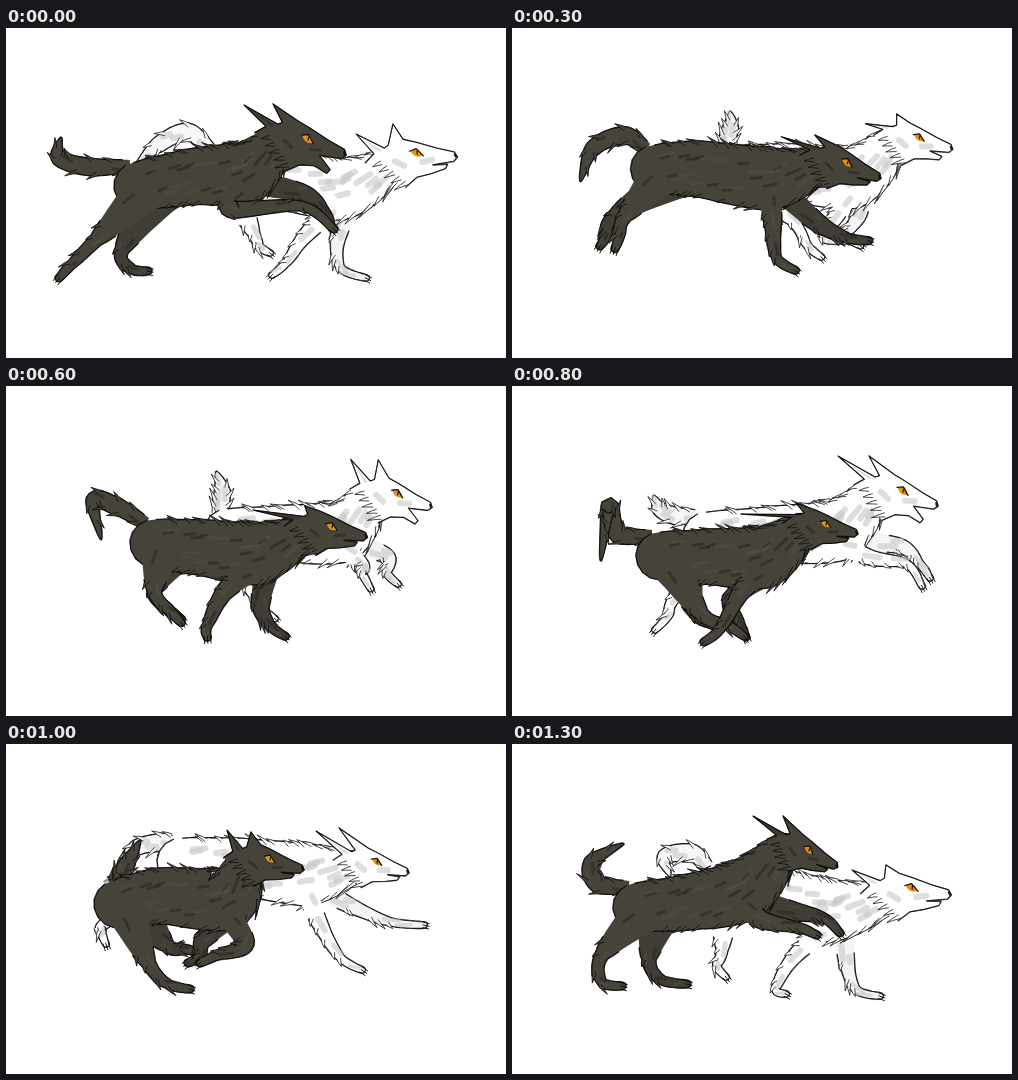
These frames come from a looping animation (500 px wide and 330 px high, 1.4 s). An HTML page with a canvas:

```html
<!DOCTYPE html>
<html lang="en">
<head>
<meta charset="utf-8">
<title>Two running wolves</title>
<style>
html, body { margin: 0; width: 100%; height: 100%; overflow: hidden; background: #fff; }
canvas { display: block; width: 500px; height: 330px; }
</style>
</head>
<body>
<canvas id="stage" width="500" height="330"></canvas>
<script>
const ctx = document.getElementById('stage').getContext('2d');
const STEP = 100, STEPS = 14;
const keys = [0, 2, 5, 8, 10, 12, 13, 14];

// Each pose: spine (rump, waist, chest) / tail / face (ear tips, eye, nose) /
// near fore leg / far fore leg / near hind leg / far hind leg
const darkPoses = [
  '132,158 185,149 240,143 / 85,139 53,130 55,110 / 238,77 267,76 302,111 339,126 / 225,181 295,178 328,201 / 298,166 318,182 326,200 / 90,212 66,236 53,250 / 116,222 126,241 142,243',
  '140,136 182,133 262,143 / 112,108 80,125 54,158 / 276,102 301,100 337,131 368,148 / 284,188 298,225 322,239 / 325,183 362,194 384,194 / 105,186 92,203 81,216 / 88,186 70,205 58,213',
  '148,151 195,157 250,165 / 112,106 83,112 98,142 / 256,122 306,121 332,142 368,152 / 214,205 198,238 206,249 / 272,222 284,242 302,250 / 128,194 139,218 147,230 / 130,194 141,217 148,228',
  '148,170 200,171 252,170 / 106,148 97,120 89,174 / 229,128 284,117 314,138 345,147 / 230,205 208,243 192,256 / 220,213 228,238 234,251 / 190,228 215,239 232,250 / 185,228 210,238 230,243',
  '112,160 155,152 220,154 / 112,136 122,118 134,97 / 221,86 245,88 264,115 297,125 / 239,200 212,211 194,219 / 198,195 194,212 182,219 / 143,220 162,240 184,245 / 162,202 178,205 188,207',
  '125,157 180,155 232,146 / 82,140 104,114 98,91 / 222,82 253,82 275,107 309,117 / 258,178 278,185 272,205 / 262,184 255,194 240,200 / 97,214 106,240 127,245 / 154,216 164,236 190,242',
  '125,163 178,158 232,145 / 86,140 80,118 111,100 / 241,72 271,72 297,106 325,122 / 250,176 285,183 305,191 / 285,168 312,174 328,189 / 90,211 90,238 110,242 / 137,216 150,236 175,240'
];
const palePoses = [
  '215,145 265,150 335,160 / 182,104 152,117 130,138 / 350,106 387,96 411,125 450,128 / 300,207 280,235 266,247 / 332,210 335,240 360,250 / 248,206 254,219 264,225',
  '220,140 270,142 340,150 / 204,110 203,100 205,89 / 353,106 387,91 415,110 447,120 / 306,195 300,220 322,217 / 330,195 318,215 333,226 / 275,185 288,215 298,230',
  '235,145 285,147 340,145 / 240,111 250,94 245,74 / 354,75 380,76 392,109 425,121 / 354,184 336,190 342,204 / 378,176 368,192 379,201 / 292,208 312,224 332,227',
  '195,150 265,148 325,143 / 165,130 148,123 142,110 / 326,70 357,70 391,105 425,119 / 360,172 395,178 410,200 / 388,160 408,178 418,192 / 162,212 156,230 143,244',
  '175,118 230,122 300,130 / 155,98 130,104 112,120 / 310,87 333,84 371,118 402,128 / 315,182 335,214 356,226 / 345,162 385,178 418,181 / 103,176 96,188 100,200',
  '200,140 255,152 310,160 / 148,119 152,101 180,101 / 333,120 341,110 386,146 425,151 / 280,200 270,233 296,243 / 345,205 368,235 394,243 / 172,190 168,203 172,210',
  '205,145 262,152 320,166 / 180,109 153,113 158,132 / 340,126 374,121 400,144 438,150 / 283,212 264,244 274,250 / 335,220 345,246 368,252 / 210,206 205,222 214,233'
];
const parts = ['spine', 'tail', 'face', 'fn', 'ff', 'hn', 'hf'];
const girth = { spine: [24, 28, 32, 17], tail: [6, 9, 8, 1], fore: [13, 9, 5, 4], hind: [23, 7, 5, 4] };

// Skull outline, with the eye at the origin and the nose at (1, 0)
const brow = [[-0.38, -0.32], [-0.05, -0.27], [0.5, -0.16], [0.95, -0.1], [1.04, 0.02], [0.95, 0.14], [0.42, 0.27]];
const chin = [[0.8, 0.22], [0.76, 0.34], [0.4, 0.5], [0.05, 0.62], [-0.22, 0.9]];

const coats = {
  dark: {
    poses: darkPoses, fill: '#46433b', far: '#403d36', tail: '#46433b', line: '#100f0c',
    marks: ['rgba(32,30,25,.45)', 'rgba(92,88,77,.3)'], brush: 3, slim: 1, gape: [1, 0, 0, 0, 0, 0, 0]
  },
  pale: {
    poses: palePoses, fill: '#fff', far: '#f4f4f4', tail: '#f7f7f7', line: '#1a1a1a',
    marks: ['rgba(200,200,200,.6)'], brush: 6, slim: 0.85, gape: [0, 0, 1, 1, 0, 0, 0]
  }
};
for (const coat of Object.values(coats))
  coat.poses = coat.poses.map(row => Object.fromEntries(row.split(' / ').map((list, i) =>
    [parts[i], list.split(' ').map(p => p.split(',').map(Number))])));

const lerp = (a, b, t) => a + (b - a) * t;
const mix = (a, b, t) => [lerp(a[0], b[0], t), lerp(a[1], b[1], t)];
const add = (p, x, y) => [p[0] + x, p[1] + y];
const rand = n => { const v = Math.sin(n * 91.7 + 3.1) * 4375.5; return v - Math.floor(v); };

// Catmull-Rom curve through the joints, with a half width, tangent and normal at each sample
function sample(joints, widths, slim, n = 36) {
  const last = joints.length - 1, at = i => joints[Math.max(0, Math.min(last, i))];
  const spots = [];
  for (let k = 0; k <= n; k++) {
    const u = k / n * last, i = Math.min(last - 1, Math.floor(u)), f = u - i;
    const [a, b, c, d] = [at(i - 1), at(i), at(i + 1), at(i + 2)];
    const p = [0, 1].map(j => b[j] + f / 2 * (c[j] - a[j] +
      f * (2 * a[j] - 5 * b[j] + 4 * c[j] - d[j] + f * (3 * (b[j] - c[j]) + d[j] - a[j]))));
    spots.push({ p, w: slim * lerp(widths[i], widths[i + 1], f) });
  }
  spots.forEach((s, k) => {
    const a = spots[Math.max(0, k - 1)].p, b = spots[Math.min(n, k + 1)].p;
    const d = Math.hypot(b[0] - a[0], b[1] - a[1]) || 1;
    s.t = [(b[0] - a[0]) / d, (b[1] - a[1]) / d];
    s.n = [-s.t[1], s.t[0]];
  });
  return spots;
}

const edge = (s, v) => [s.p[0] + s.n[0] * s.w * v, s.p[1] + s.n[1] * s.w * v];

function cap(s, from) {
  const a = Math.atan2(s.n[1], s.n[0]) + from;
  const out = [];
  for (let i = 1; i < 8; i++) {
    const b = a + Math.PI * i / 8;
    out.push([s.p[0] + Math.cos(b) * s.w, s.p[1] + Math.sin(b) * s.w]);
  }
  return out;
}

function path(pts) {
  ctx.beginPath();
  pts.forEach(p => ctx.lineTo(...p));
}

// Ink line with a faint second pass, as drawn by hand
function ink(pts, color) {
  path(pts);
  ctx.strokeStyle = color;
  ctx.lineWidth = 1.1;
  ctx.stroke();
  path(pts.map((p, i) => add(p, 0.6 * Math.sin(i * 0.7), 0.6 * Math.cos(i * 0.5))));
  ctx.lineWidth = 0.6;
  ctx.stroke();
}

function tube(spots, fill, line, skip, roundStart) {
  const outline = list => [
    ...list.map(s => edge(s, -1)),
    ...cap(list[list.length - 1], Math.PI),
    ...list.map(s => edge(s, 1)).reverse(),
    ...(roundStart ? cap(list[0], 0) : [])
  ];
  path(outline(spots));
  ctx.fillStyle = fill;
  ctx.fill();
  ink(outline(spots.slice(skip)), line);
}

function hair(p, dir, len, fill, line, width = 2) {
  const tip = add(p, dir[0] * len, dir[1] * len);
  const root = add(p, -dir[0] * 4, -dir[1] * 4);
  ctx.beginPath();
  ctx.moveTo(root[0] - dir[1] * width, root[1] + dir[0] * width);
  ctx.quadraticCurveTo(p[0] - dir[1] * width, p[1] + dir[0] * width, ...tip);
  ctx.quadraticCurveTo(p[0] + dir[1], p[1] - dir[0], root[0] + dir[1] * width, root[1] - dir[0] * width);
  ctx.fillStyle = fill;
  ctx.fill();
  ctx.strokeStyle = line;
  ctx.lineWidth = 0.8;
  ctx.stroke();
}

// Tufts that lie along a tube; flow is -1 towards its root, 1 towards its end
function fur(spots, count, size, flow, fill, line, seed, pick) {
  for (let k = 0; k < count; k++) {
    const s = spots[Math.floor((0.1 + 0.85 * (k + rand(k + seed)) / count) * (spots.length - 1))];
    const side = pick(s, k);
    if (!side) continue;
    const out = 0.25 + 0.3 * rand(k + seed + 7);
    const dir = [0, 1].map(j => s.t[j] * flow * 0.85 + s.n[j] * side * out);
    hair(edge(s, side * 0.97), dir, size * (0.5 + rand(k + seed + 40)), fill, line);
  }
}

function brush(spots, count, coat, seed) {
  for (let k = 0; k < count; k++) {
    const s = spots[Math.floor((0.1 + 0.8 * (k + rand(k + seed)) / count) * (spots.length - 1))];
    const m = edge(s, 1.2 * rand(k + seed + 20) - 0.6), l = 3 + 5 * rand(k + seed + 50);
    ctx.beginPath();
    ctx.moveTo(m[0] - s.t[0] * l, m[1] - s.t[1] * l);
    ctx.quadraticCurveTo(m[0], m[1] - 1, m[0] + s.t[0] * l, m[1] + s.t[1] * l - 2);
    ctx.strokeStyle = coat.marks[k % coat.marks.length];
    ctx.lineWidth = Math.min(coat.brush, s.w * 0.9);
    ctx.stroke();
  }
}

function toes(s, line) {
  ctx.strokeStyle = line;
  ctx.lineWidth = 1;
  for (let v = -1; v <= 1; v++) {
    const a = edge(s, v * 0.8);
    ctx.beginPath();
    ctx.moveTo(a[0] - s.t[0], a[1] - s.t[1]);
    ctx.lineTo(a[0] + s.t[0] * 5, a[1] + s.t[1] * 5 + 1);
    ctx.stroke();
  }
}

function leg(root, joints, widths, fill, coat, seed) {
  const spots = sample([root, ...joints], widths, coat.slim);
  tube(spots, fill, coat.line, 9);
  brush(spots, 4, coat, seed);
  fur(spots.slice(8, 28), 5, 6, 1, fill, coat.line, seed, s => -Math.sign(s.n[0]));
  toes(spots[spots.length - 1], coat.line);
}

// Maps skull coordinates to the stage
function skull([, , eye, nose]) {
  const x = nose[0] - eye[0], y = nose[1] - eye[1];
  return (u, v) => [eye[0] + u * x - v * y, eye[1] + u * y + v * x];
}

function head(face, at, gape, coat) {
  const [back, front] = face;
  const pts = [
    at(-1.3, 0.35), at(-1.1, 0.1), back, at(-0.85, -0.06), at(-0.75, -0.14), front,
    ...brow.map(p => at(...p)),
    ...chin.map(([u, v], i) => at(u, v + (i < 2 ? 0.28 : 0.06) * gape))
  ];
  path(pts);
  ctx.fillStyle = coat.fill;
  ctx.fill();

  const line = (color, width, ...list) => {
    path(list.map(p => at(...p)));
    ctx.strokeStyle = color;
    ctx.lineWidth = width;
    ctx.stroke();
  };
  line(coat.marks[0], coat.brush, [-0.55, 0.25], [-0.3, 0.35]);
  line(coat.marks[0], coat.brush, [0.15, 0.22], [0.4, 0.14]);
  path([mix(at(-0.9, 0), back, 0.75), at(-0.9, 0), at(-0.98, 0.05)]);
  ctx.fillStyle = coat.marks[0];
  ctx.fill();
  ink(pts, coat.line);
  for (let k = 0; k < 5; k++) {
    const a = at(-0.3 - 0.17 * k, 0.85 - 0.12 * k), b = at(-0.55 - 0.22 * k, 1.02 - 0.1 * k);
    const d = Math.hypot(b[0] - a[0], b[1] - a[1]);
    hair(a, [(b[0] - a[0]) / d, (b[1] - a[1]) / d], 5 + 5 * rand(k), coat.fill, coat.line);
  }

  ctx.beginPath();
  ctx.moveTo(...at(-0.16, -0.02));
  ctx.quadraticCurveTo(...at(0, -0.19), ...at(0.15, 0.05));
  ctx.quadraticCurveTo(...at(-0.02, 0.16), ...at(-0.16, -0.02));
  ctx.fillStyle = '#e39312';
  ctx.fill();
  line('#17120a', 1.3, [-0.19, -0.03], [-0.03, -0.11], [0.17, 0.06]);
  line('#17120a', 1.2, [0, -0.06], [0.01, 0.03]);
  line(coat.line, 2, [0.96, -0.04], [1, 0.02]);
}

function wolf(coat, from, to, t) {
  const a = coat.poses[from], b = coat.poses[to];
  const part = k => a[k].map((p, i) => mix(p, b[k][i], t));
  const face = part('face'), at = skull(face), spine = part('spine');
  const [rump, , chest] = spine;
  const { fill, line, far } = coat;

  if (a.hf) leg(add(rump, 22, 8), part('hf'), girth.hind, far, coat, 11);
  leg(add(chest, 12, 12), part('ff'), girth.fore, far, coat, 23);

  const tail = sample([add(rump, -8, -20), ...part('tail')], girth.tail, 1);
  tube(tail, coat.tail, line, 3);
  brush(tail, 4, coat, 31);
  fur(tail, 9, 8, 1, coat.tail, line, 37, (s, k) => k % 2 ? 1 : -1);

  const body = sample([...spine, at(-0.7, 0.4)], girth.spine, 1, 60);
  tube(body, fill, line, 0, true);
  brush(body, 26, coat, 43);
  fur(body, 16, 8, -1, fill, line, 53, () => -1);
  fur(body.slice(6, 36), 6, 7, -1, fill, line, 61, () => 1);
  fur(body.slice(34), 9, 13, -1, fill, line, 67, () => 1);

  leg(add(rump, 8, 4), part('hn'), girth.hind, fill, coat, 71);
  leg(add(chest, 0, 14), part('fn'), girth.fore, fill, coat, 83);
  head(face, at, lerp(coat.gape[from], coat.gape[to], t), coat);
}

function draw(step) {
  let i = 0;
  while (keys[i + 1] <= step) i++;
  const t = (step - keys[i]) / (keys[i + 1] - keys[i]), next = (i + 1) % 7;
  ctx.fillStyle = '#fff';
  ctx.fillRect(0, 0, 500, 330);
  ctx.lineCap = ctx.lineJoin = 'round';
  wolf(coats.pale, i, next, t);
  wolf(coats.dark, i, next, t);
}

let shown = 0;
const start = performance.now();
draw(0);
function tick() {
  const step = Math.floor(Math.max(0, performance.now() - start) / STEP) % STEPS;
  if (step !== shown) draw(shown = step);
  requestAnimationFrame(tick);
}
requestAnimationFrame(tick);
</script>
</body>
</html>
```
